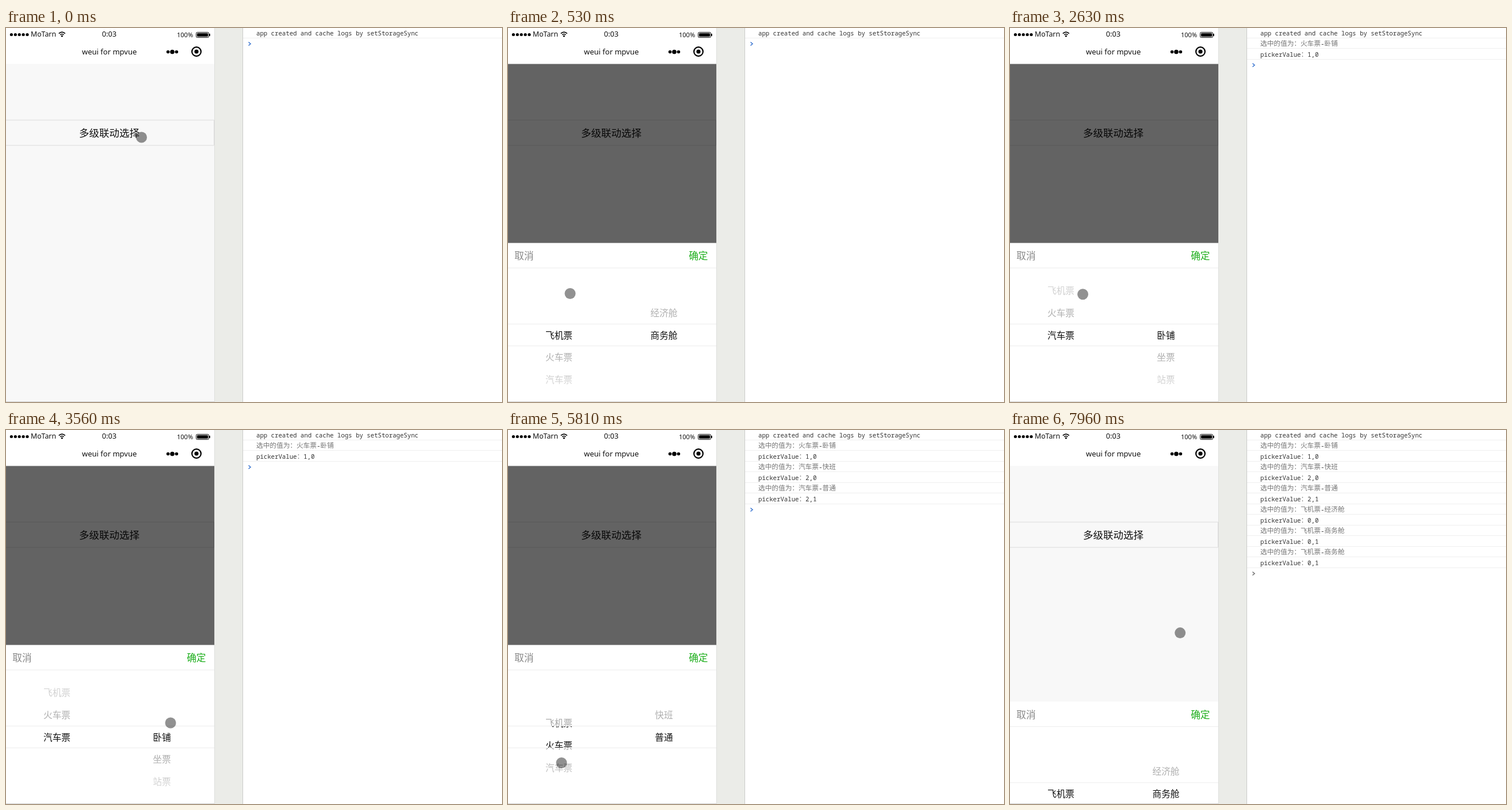
An HTML page for the animation above (8000 ms loop, 862 by 650 pixels).

```html
<!DOCTYPE html>
<html lang="zh-CN">
<head>
<meta charset="utf-8">
<title>Linked picker</title>
<style>
  html, body { margin: 0; width: 100%; height: 100%; overflow: hidden; background: #fff; }
  svg { display: block; }
  text { font-family: "Noto Sans", "Noto Sans CJK SC", "Noto Sans CJK", sans-serif; fill: #111; }
  .cjk { font-family: "Noto Sans CJK SC", "Noto Sans CJK", sans-serif; }
  .item { font-size: 15.7px; text-anchor: middle; }
  .log { font: 10.68px "Noto Sans Mono", monospace; fill: #333; }
  .log .cjk { font-size: 11.66px; fill: #777; }
</style>
</head>
<body>
<svg width="862" height="650" viewBox="0 0 862 650">
  <defs>
    <linearGradient id="fadeTop" x2="0" y2="1">
      <stop offset="0" stop-color="#fff" stop-opacity=".95"/>
      <stop offset="1" stop-color="#fff" stop-opacity=".6"/>
    </linearGradient>
    <linearGradient id="fadeBottom" x2="0" y2="1">
      <stop offset="0" stop-color="#fff" stop-opacity=".6"/>
      <stop offset="1" stop-color="#fff" stop-opacity=".95"/>
    </linearGradient>
    <clipPath id="screen"><rect width="362" height="649"/></clipPath>
  </defs>

  <!-- Phone page -->
  <rect width="862" height="650" fill="#fff"/>
  <rect y="62.5" width="362" height="587" fill="#f8f8f8"/>
  <rect x="362" width="50" height="650" fill="#ebece8"/>
  <path d="M362.5 0V650" stroke="#dededc"/>
  <path d="M411.5 0V650" stroke="#cbcbc9"/>
  <path d="M0 160H361.5V204H0" fill="none" stroke="#dcdcdc"/>
  <text class="cjk" x="179.5" y="188.6" font-size="17.5" text-anchor="middle">多级联动选择</text>

  <!-- Status and title bars -->
  <path d="M9.4 11.5H38" stroke="#000" stroke-width="5.2" stroke-linecap="round" stroke-dasharray="0 6.9"/>
  <text x="43" y="15" font-size="12.3">MoTarn</text>
  <g fill="none" stroke="#000" stroke-width="1.6">
    <path d="M91.8 9.6Q97.3 4.6 102.8 9.6M94 12Q97.3 9 100.6 12"/>
    <circle cx="97.3" cy="14" r=".8"/>
  </g>
  <text x="179.5" y="15" font-size="12.8" text-anchor="middle">0:03</text>
  <text x="297" y="15.5" font-size="11">100%</text>
  <rect x="330.5" y="7.5" width="22" height="9" rx="2" fill="none" stroke="#000"/>
  <rect x="332" y="9" width="19" height="6" rx="1"/>
  <path d="M354 10V14" stroke="#000" stroke-width="1.6"/>
  <text x="132" y="46" font-size="13">weui for mpvue</text>
  <circle cx="281.6" cy="41.5" r="2.8"/>
  <circle cx="289" cy="41.5" r="3.8"/>
  <circle cx="296.4" cy="41.5" r="2.8"/>
  <circle cx="331" cy="41" r="7.9" fill="none" stroke="#000" stroke-width="2.2"/>
  <circle cx="331" cy="41" r="3.6"/>

  <!-- Picker -->
  <g clip-path="url(#screen)">
    <rect id="mask" y="62.5" width="362" height="587" fill-opacity=".6"/>
    <g id="sheet">
      <rect y="373.6" width="362" height="277" fill="#fff"/>
      <text class="cjk" x="11.3" y="402.4" font-size="16.7" style="fill:#888">取消</text>
      <text class="cjk" x="314.2" y="402.4" font-size="16.7" font-weight="500" style="fill:#1aad19">确定</text>
      <g id="columns"></g>
      <rect y="417" width="362" height="97" fill="url(#fadeTop)"/>
      <rect y="553" width="362" height="97" fill="url(#fadeBottom)"/>
      <path d="M0 417H362M0 514.5H362M0 552.5H362" stroke="#ececec"/>
    </g>
  </g>
  <path d="M0 649.5H362" stroke="#d0d0d0"/>
  <circle id="cursor" r="9.5" fill-opacity=".43"/>

  <!-- Console -->
  <g id="console"></g>
  <path id="prompt" d="M421.5 -3L425 0L421.5 3" fill="none" stroke-width="1.5"/>
</svg>

<script>
const LOOP = 8000, OPEN = 215, CLOSE = 7920;
const SLIDE_TIME = 300, MOVE_TIME = 580, DRAG_TIME = 300;
const ROW = 38.75, LOG_ROW = 18.5;
const $ = id => document.getElementById(id);

const TICKETS = ["飞机票", "火车票", "汽车票"];
const SEATS = [["经济舱", "商务舱"], ["卧铺", "坐票", "站票"], ["快班", "普通"]];

const progress = (t, at, duration) => Math.min(Math.max((t - at) / duration, 0), 1);
const easeOut = p => 1 - (1 - p) ** 3;
const smooth = p => p * p * (3 - 2 * p);

// Actions change the state according to how far they have got at time t
const move = (at, x, y) => (state, t) => {
  const p = easeOut(progress(t, at, MOVE_TIME));
  state.x += (x - state.x) * p;
  state.y += (y - state.y) * p;
};
const drag = (at, column, rows) => (state, t) => {
  const p = progress(t, at, DRAG_TIME * Math.abs(rows));
  state.y -= 1.1 * ROW * rows * p;
  state[column] += rows * smooth(p);
};
const pick = at => (state, t) => {
  if (t < at) return;
  const ticket = Math.round(state.ticket);
  if (ticket !== state.picked) state.seat = 0;
  state.picked = ticket;
  const seat = Math.round(state.seat);
  state.logs.push(`选中的值为：${TICKETS[ticket]}-${SEATS[ticket][seat]}`,
                  `pickerValue：${ticket},${seat}`);
};

const ACTIONS = [
  move(230, 92, 495.5), drag(1110, "ticket", 1), move(1400, 99.5, 451), pick(1640),
  move(1730, 98, 497), drag(2240, "ticket", 1), move(2600, 286, 509), pick(3640),
  drag(4010, "seat", 1), move(4450, 93, 525), pick(4920),
  drag(5435, "ticket", -2), move(6100, 285.5, 509), pick(6450),
  drag(6900, "seat", 1), move(7240, 331, 396), pick(7600),
  move(7840, 261, 310), pick(CLOSE)
];

function stateAt(t) {
  const state = {
    x: 235.5, y: 190, ticket: 0, seat: 1, picked: 0,
    logs: ["app created and cache logs by setStorageSync"]
  };
  ACTIONS.forEach(act => act(state, t));
  return state;
}

function makeColumn(names, x) {
  const group = document.createElementNS("http://www.w3.org/2000/svg", "g");
  group.innerHTML = names.map((name, i) =>
    `<text class="item cjk" x="${x}" y="${539.6 + i * ROW}">${name}</text>`).join("");
  $("columns").append(group);
  return group;
}
const ticketColumn = makeColumn(TICKETS, 88.5);
const seatColumns = SEATS.map(names => makeColumn(names, 271));

$("console").innerHTML = stateAt(LOOP).logs.map((message, i) => {
  const text = message.replace(/[^\x00-\x7f]+/g, '<tspan class="cjk">$&</tspan>');
  const line = Math.floor(17 + i * LOG_ROW) + 0.5;
  return `<g><text class="log" x="435" y="${12.6 + i * LOG_ROW}">${text}</text>
    <path d="M412 ${line}H862" stroke="#efefef"/></g>`;
}).join("");
const logLines = [...$("console").children];

const shift = (element, x, y) => element.setAttribute("transform", `translate(${x} ${y})`);
const show = (element, on) => element.setAttribute("display", on ? "inline" : "none");
const slide = (t, at) => easeOut(progress(t, at, SLIDE_TIME));

function draw(t) {
  const { x, y, ticket, seat, picked, logs } = stateAt(t);

  show($("mask"), t >= OPEN && t < CLOSE);
  shift($("sheet"), 0, 276 * (1 - slide(t, OPEN) + slide(t, CLOSE)));
  shift(ticketColumn, 0, -ROW * ticket);
  seatColumns.forEach((column, i) => {
    show(column, i === picked);
    shift(column, 0, -ROW * seat);
  });
  shift($("cursor"), x, y);

  logLines.forEach((line, i) => show(line, i < logs.length));
  shift($("prompt"), 0, 9 + logs.length * LOG_ROW);
  $("prompt").setAttribute("stroke", t < CLOSE ? "#3672d0" : "#6e6e6e");
}

const start = performance.now();
function tick() {
  draw((performance.now() - start) % LOOP);
  requestAnimationFrame(tick);
}
tick();
</script>
</body>
</html>
```
